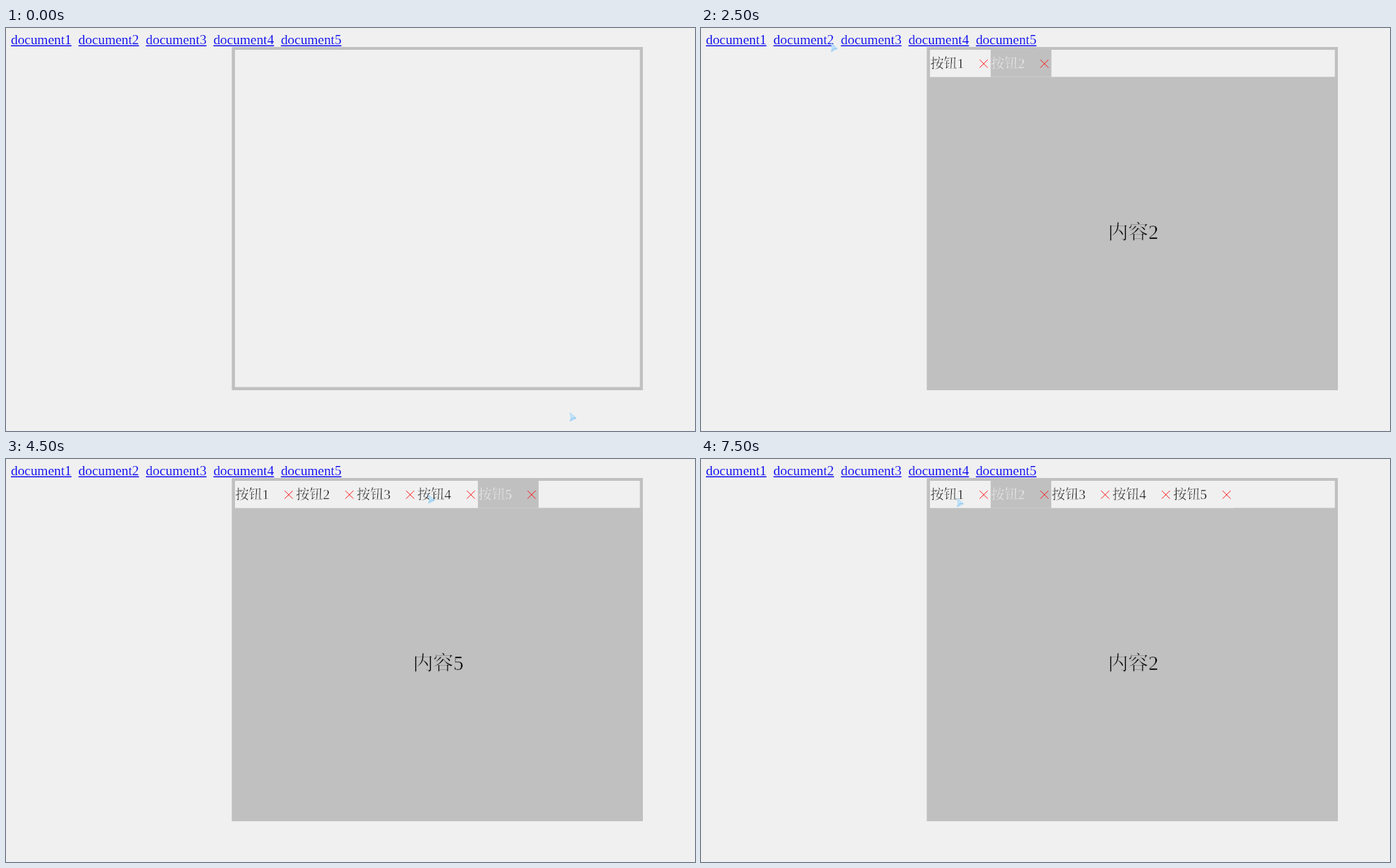
Recreate the animation shown at these times as an HTML page with a canvas. Size 978 by 573 pixels, loop 8000 ms.

```html
<!DOCTYPE html>
<html lang="zh-CN">
<head>
<meta charset="utf-8">
<style>
  html, body { margin: 0; width: 100%; height: 100%; overflow: hidden; background: #f0f0f0; }
  canvas { display: block; }
</style>
</head>
<body>
<canvas id="stage" width="978" height="573"></canvas>
<script>
const ctx = document.getElementById('stage').getContext('2d');
const FAMILY = '"Liberation Serif", "Noto Serif CJK SC", "Noto Sans CJK SC", serif';
const PAPER = '#f0f0f0', SILVER = '#c0c0c0', LINK = '#0000ee', RED = '#ff0000';
const LOOP = 8000, STEP = 500, COUNT = 5, TAB_WIDTH = 86.2, LINK_PITCH = 95.8;
const PRESS_STEP = 7, BROWSE_STEP = 10;

// Stops of the pointer; it moves evenly from one to the next
const stops = [
  { at: 0, x: 799, y: 546 },
  { at: 1, x: 12, y: 44 },
  { at: 2, x: 12, y: 44 },
  { at: 3, x: 40, y: 14 },
  { at: 4, x: 104, y: 24 },
  { at: 7, x: 341, y: 14 },
  { at: 9, x: 598, y: 50 },
  { at: 10, x: 600, y: 54 },
  { at: 11, x: 528, y: 59 },
  { at: 13, x: 348, y: 56 },
  { at: 15, x: 362, y: 55 }
];

const clamp = (value, low, high) => Math.min(high, Math.max(low, value));

function pointerAt(step) {
  const to = stops.find(stop => stop.at >= step);
  const from = stops[Math.max(0, stops.indexOf(to) - 1)];
  const k = (step - from.at) / (to.at - from.at || 1);
  return [from.x + (to.x - from.x) * k, from.y + (to.y - from.y) * k];
}

function rect(x, y, w, h, color) {
  ctx.fillStyle = color;
  ctx.fillRect(x, y, w, h);
}

// A thin outline in the background colour slims the strokes
function text(str, x, y, size, color, background, slimming) {
  ctx.font = `300 ${size}px ${FAMILY}`;
  ctx.fillStyle = color;
  ctx.fillText(str, x, y);
  ctx.strokeStyle = background;
  ctx.lineWidth = size * slimming;
  ctx.lineJoin = 'round';
  ctx.strokeText(str, x, y);
}

function drawLinks(pressed) {
  for (let n = 1; n <= COUNT; n++) {
    const x = 7 + (n - 1) * LINK_PITCH, color = n === pressed ? RED : LINK;
    text('document' + n, x, 23, 19.35, color, PAPER, 0.01);
    rect(x, 24.6, 86, 1.4, color);
  }
}

function drawTab(n, active) {
  const x = 325 + (n - 1) * TAB_WIDTH, background = active ? SILVER : PAPER;
  rect(x, 31, TAB_WIDTH, 38.5, background);
  text('按钮' + n, x + 0.4, 57.3, 19.2, active ? PAPER : '#000', background, 0.02);
  ctx.strokeStyle = RED;
  ctx.lineWidth = 0.9;
  ctx.beginPath();
  ctx.moveTo(x + 70.5, 45);
  ctx.lineTo(x + 82, 56.5);
  ctx.moveTo(x + 82, 45);
  ctx.lineTo(x + 70.5, 56.5);
  ctx.stroke();
}

function drawPanel(open, active) {
  rect(320.5, 27, 583.5, 488, SILVER);
  rect(325, 31, 574.7, open ? 38.5 : 479.5, PAPER);
  for (let n = 1; n <= open; n++) drawTab(n, n === active);
  if (open) text('内容' + active, 577.5, 300, 28.8, '#000', SILVER, 0.02);
}

function drawPointer(x, y) {
  ctx.save();
  ctx.translate(x, y);
  ctx.lineWidth = 0.8;
  ctx.fillStyle = '#c4e4fa';
  ctx.strokeStyle = '#a3d3f5';
  const arrow = new Path2D('M1.5 1 L10.5 8.5 L6 11 L1.5 13 L3 8 Z');
  ctx.fill(arrow);
  ctx.stroke(arrow);
  ctx.strokeStyle = '#78b8e8';
  ctx.stroke(new Path2D('M3 12 L5.5 8 L10 9'));
  ctx.restore();
}

function frame() {
  const step = Math.floor(performance.now() % LOOP / STEP);
  // A tab opens at each step, except while the fourth link is held down
  const open = clamp(step - (step < PRESS_STEP ? 3 : 4), 0, COUNT);
  const active = step < BROWSE_STEP ? open : clamp(15 - step, 2, 4);
  rect(0, 0, 978, 573, PAPER);
  drawLinks(step === PRESS_STEP ? 4 : 0);
  drawPanel(open, active);
  drawPointer(...pointerAt(step));
  requestAnimationFrame(frame);
}
frame();
</script>
</body>
</html>
```
